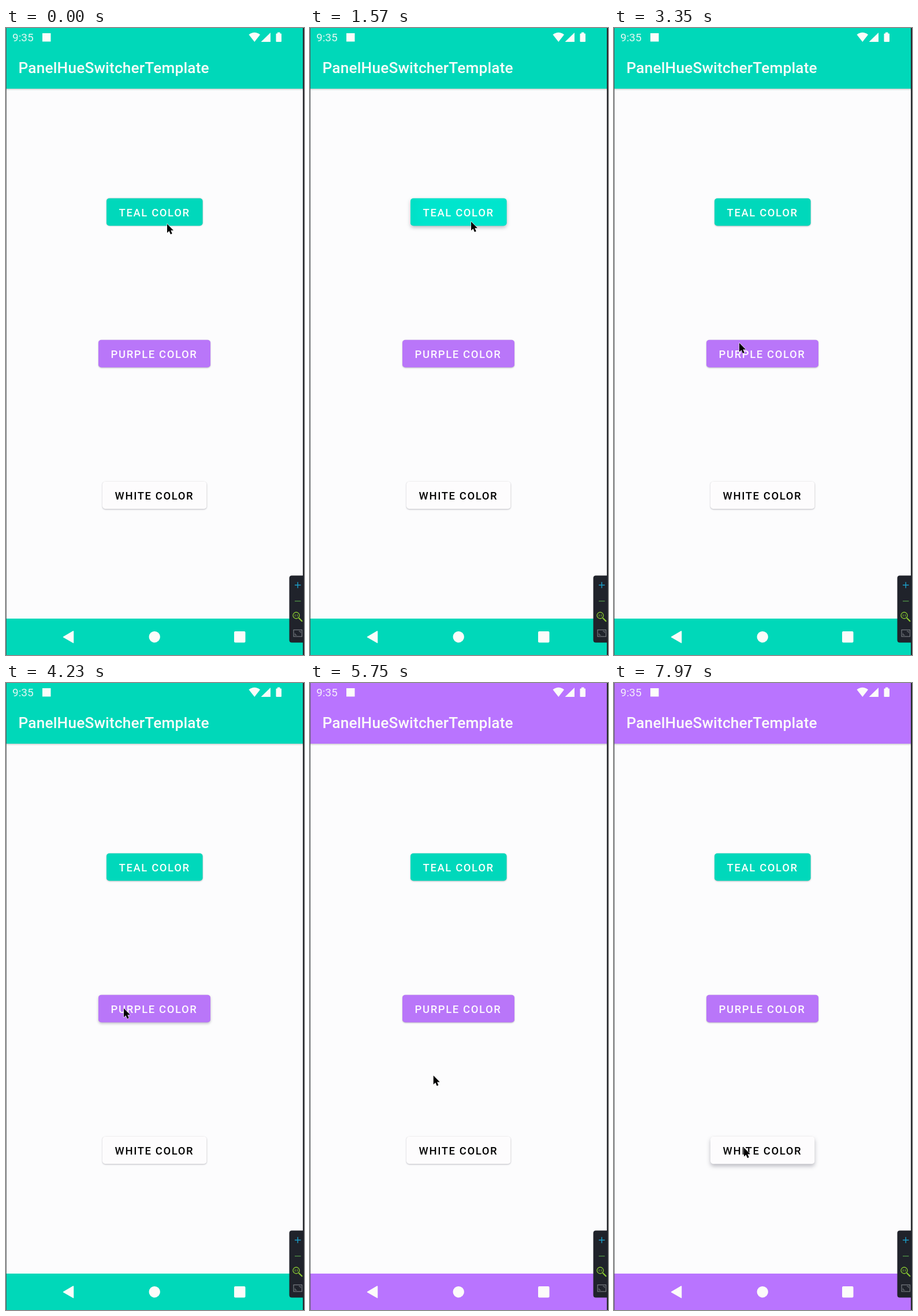
Write an HTML page that moves like this. It is 516x1085 px and loops after 7.99 s.

```html
<!DOCTYPE html>
<html lang="en">
<head>
<meta charset="utf-8">
<title>Bar colours</title>
<style>
  html, body { margin: 0; width: 100%; height: 100%; overflow: hidden; background: #fcfcfd; }
  svg { display: block; width: 100%; height: 100%; }
  text { font-family: Roboto, "Noto Sans", sans-serif; white-space: pre; }
  .label { font-size: 18.4px; font-weight: 500; letter-spacing: 1.64px; }
</style>
</head>
<body>
<svg viewBox="0 0 516 1085" preserveAspectRatio="none">
  <defs>
    <linearGradient id="barShade" x2="0" y2="1">
      <stop offset="0" stop-color="#000" stop-opacity=".2"/>
      <stop offset="1" stop-color="#000" stop-opacity="0"/>
    </linearGradient>
  </defs>
  <rect width="516" height="1085" fill="#fcfcfd"/>
  <rect y="104.5" width="516" height="4" fill="url(#barShade)"/>
  <rect class="bar" width="516" height="105"/>
  <rect class="bar" y="1022" width="516" height="63"/>

  <g fill="#fcfcfa">
    <text x="11" y="23" font-size="19" fill-opacity=".9">9:35</text>
    <rect x="63" y="9" width="14.5" height="14.5"/>
    <path d="M420.5 11.5Q430.300 4 440 11.500L430.300 24Z"/>
    <path d="M458 8V24H441.500Z"/>
    <path d="M470 7.500H474.500V9.500H476Q477 9.500 477 10.500V23Q477 24 476 24H468.500Q467.500 24 467.500 23V10.500Q467.500 9.500 468.500 9.500H470Z"/>
    <text x="21.500" y="78" font-size="26.2" font-weight="500" letter-spacing=".2">PanelHueSwitcherTemplate</text>
    <path d="M99.500 1053.800L116.500 1044V1063.700Z" stroke="#fcfcfa" stroke-width="1.500" stroke-linejoin="round"/>
    <circle cx="257.200" cy="1053.700" r="9.700"/>
    <rect x="395" y="1044" width="19.500" height="19.500" rx="2"/>
  </g>

  <g id="buttons"></g>

  <rect width=".8" height="1085" fill="#4b5054"/>
  <rect x="514" width="2" height="1085" fill="#26282c"/>

  <g fill="none">
    <path d="M516 947.500H495Q490.500 947.500 490.500 952V1059Q490.500 1063.500 495 1063.500H516Z" fill="#20232b"/>
    <path d="M500 964H510.500M505.200 958.800V969.200" stroke="#1c9fc9" stroke-width="1.400"/>
    <path d="M500 991.700H510.500" stroke="#4d8c45" stroke-width="1.400"/>
    <g stroke="#8bcb32">
      <circle cx="502.500" cy="1016.500" r="5.500" stroke-width="1.300"/>
      <path d="M507 1021L513 1027" stroke-width="2.200"/>
      <path d="M500.500 1014.500V1018.500M504.500 1014.500V1018.500M502.500 1015.500V1016M502.500 1017.500V1018" stroke-width=".8"/>
    </g>
    <g stroke="#777b80">
      <rect x="498" y="1041.500" width="14.500" height="11.500" stroke-width="1.200"/>
      <path d="M500.500 1047.500V1050.500H503.500M507 1044H510V1047" stroke-width="1"/>
    </g>
  </g>

  <path id="cursor" d="M0 0V15.500L3.500 12.300L6 18L8.700 16.800L6.300 11.300H11Z"
        fill="#000" stroke="#fff" stroke-width="1.100" stroke-linejoin="round" paint-order="stroke"/>
</svg>

<script>
const LOOP = 7990;
const TEAL = "#00d8b9", PURPLE = "#b974ff";
const SWITCH_AT = 4900;

// Elevation keys are [time, dp]; a press gives the ripple start time and touch point.
const buttons = [
  { text: "TEAL COLOR", x: 174, y: 294.7, w: 166.5, fill: "#00d8bb", ink: "#f8fffc",
    lift: [[0, 1.3], [1440, 1.3], [1610, 7], [1720, 7], [1860, 2]],
    press: { at: 1380, x: 279, y: 335, tint: "#00f0dc", alpha: .55 } },
  { text: "PURPLE COLOR", x: 160, y: 539.7, w: 194, fill: "#b976f9", ink: "#fdf8ff",
    lift: [[0, 2], [3450, 2], [3570, 3.5], [4720, 3.5], [4820, 7], [4890, 7], [5010, 2]],
    press: { at: 4760, x: 204, y: 571, tint: "#fff", alpha: .19 } },
  { text: "WHITE COLOR", x: 167, y: 784.7, w: 180.5, fill: "#fdfcfd", ink: "#000",
    lift: [[0, 2], [7650, 2], [7790, 8]] }
];

const path = [
  [0, 279, 339], [900, 279, 339], [1200, 279, 335], [2600, 279, 335],
  [3350, 217, 545], [3700, 204, 563], [4300, 204, 563], [4550, 204, 571],
  [5300, 204, 571], [6250, 225, 805], [6700, 225, 805], [7000, 225, 804]
];

const clamp = v => Math.max(0, Math.min(1, v));
const smooth = v => v * v * (3 - 2 * v);

// Eased values between the keys [time, ...values].
function sample(keys, t) {
  const next = keys.findIndex(k => k[0] > t);
  if (next < 0) return keys[keys.length - 1].slice(1);
  const a = keys[next - 1], b = keys[next];
  const p = smooth((t - a[0]) / (b[0] - a[0]));
  return a.slice(1).map((v, i) => v + (b[i + 1] - v) * p);
}

function add(parent, tag, attrs) {
  const node = document.createElementNS("http://www.w3.org/2000/svg", tag);
  for (const name in attrs) node.setAttribute(name, attrs[name]);
  return parent.appendChild(node);
}

const root = document.getElementById("buttons");
const cursor = document.getElementById("cursor");
const bars = document.querySelectorAll(".bar");

buttons.forEach((b, i) => {
  const shape = { x: b.x, y: b.y, width: b.w, height: 47.5, rx: 5 };
  b.face = add(root, "rect", { ...shape, fill: b.fill });
  if (b.press) {
    const clip = add(root, "clipPath", { id: "clip" + i });
    add(clip, "rect", shape);
    const glow = add(root, "radialGradient", { id: "glow" + i });
    [[0, 1], [.6, 1], [1, 0]].forEach(([offset, opacity]) =>
      add(glow, "stop", { offset, "stop-color": b.press.tint, "stop-opacity": opacity }));
    const layer = add(root, "g", { "clip-path": `url(#clip${i})` });
    b.ripple = add(layer, "circle", { fill: `url(#glow${i})` });
  }
  add(root, "text", { class: "label", x: b.x + 21.6, y: b.y + 30.8, fill: b.ink }).textContent = b.text;
});

function drawRipple(b, t) {
  const { at, x, y, alpha } = b.press;
  const grow = clamp((t - at) / 450);
  const p = 1 - (1 - grow) ** 2;
  const fade = clamp((t - at) / 80) * (1 - clamp((t - at - 450) / 350));
  b.ripple.setAttribute("cx", x + (b.x + b.w / 2 - x) * p);
  b.ripple.setAttribute("cy", y + (b.y + 23.7 - y) * p);
  b.ripple.setAttribute("r", b.w * (.2 + .75 * p));
  b.ripple.setAttribute("opacity", alpha * fade);
}

function draw(t) {
  bars.forEach(bar => bar.setAttribute("fill", t < SWITCH_AT ? TEAL : PURPLE));
  buttons.forEach(b => {
    const [lift] = sample(b.lift, t);
    b.face.style.filter =
      `drop-shadow(0 0 .6px rgba(0,0,0,.13)) drop-shadow(0 ${.3 + lift * .5}px ${.3 + lift * .45}px rgba(0,0,25,.25))`;
    if (b.ripple) drawRipple(b, t);
  });
  const [x, y] = sample(path, t);
  cursor.setAttribute("transform", `translate(${x} ${y})`);
}

const start = performance.now();
function tick() {
  draw((performance.now() - start) % LOOP);
  requestAnimationFrame(tick);
}
tick();
</script>
</body>
</html>
```
